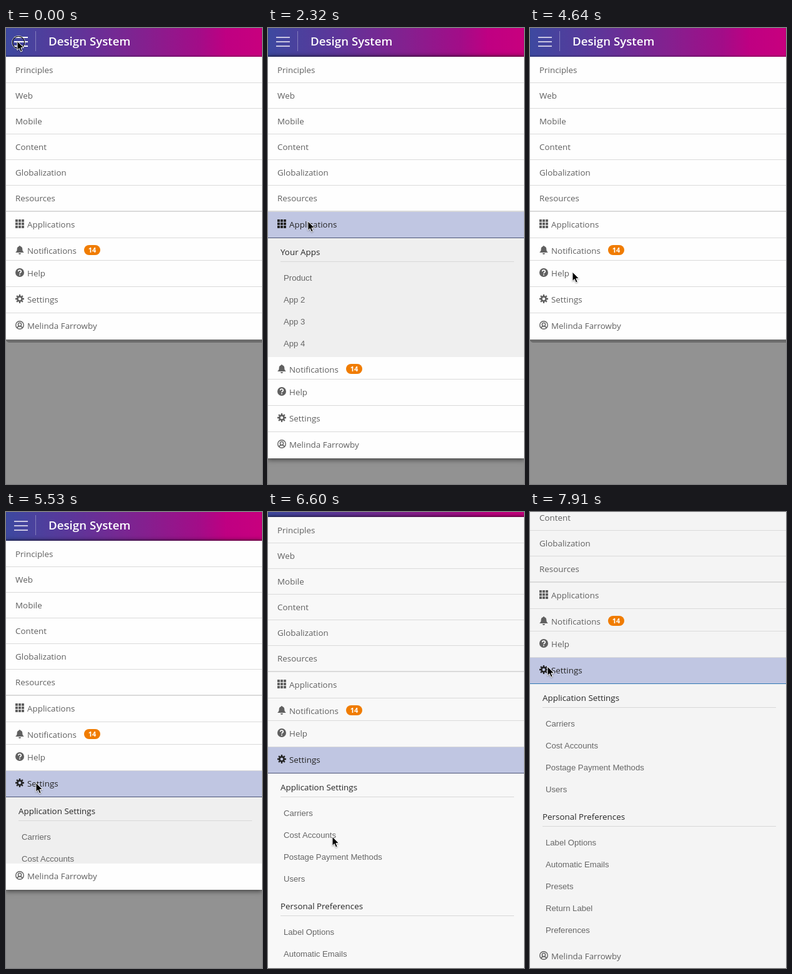
Animation, 410 px wide and 729 px high, one loop 7.99 s. Source, as an HTML page:

```html
<!DOCTYPE html>
<html lang="en">
<head>
<meta charset="utf-8">
<title>Menu</title>
<style>
html, body { margin: 0; width: 100%; height: 100%; overflow: hidden; background: #929292; }
#stage { position: relative; width: 410px; height: 729px; overflow: hidden; background: #929292;
  font: 500 13.4px/40px "Open Sans", "Noto Sans", sans-serif; color: #606060;
  --panel: #fefefe; --sub: #efefef; --edge: #4b5578; }
#page { position: absolute; left: 0; top: 0; width: 410px; }
header { position: relative; height: 46px;
  background: linear-gradient(90deg, #3d49a0, #5b379a 25%, #84208f 54%, #a20d88 75%, #bf0082 86%, #c8007e);
  box-shadow: inset 0 -2px 2px rgba(0,0,0,.22); }
header h1 { position: absolute; left: 68px; top: 0; margin: 0; color: #fff; font-size: 18.7px; font-weight: 600; line-height: 42px; white-space: nowrap; }
header::after { content: ""; position: absolute; left: 47px; top: 5px; width: 1px; height: 32px; background: rgba(255,255,255,.32); }
#burger { position: absolute; left: 13px; top: 14px; width: 22px; height: 16px; --line: #fff;
  background: linear-gradient(var(--line) 2px, transparent 2px 7px, var(--line) 7px 9px, transparent 9px 14px, var(--line) 14px); }
#panel { position: relative; background: var(--panel); box-shadow: 0 1px 8px 1px rgba(0,0,0,.6); }
#panel.closed { box-shadow: none; }
#panel.closed::after { content: ""; position: absolute; left: 0; right: 0; top: 100%; height: 5px; background: #6c6c6c; border-radius: 0 0 0 6px; }
.row { position: relative; box-sizing: border-box; height: 41px; padding-left: 15px; border-bottom: 1px solid #dadada; white-space: nowrap; }
.row.first { height: 42px; padding-top: 1px; }
.row.thick { height: 42px; border-bottom: 2px solid #dadada; }
.row.icon { height: 42px; padding-left: 34px; }
.row.short { height: 36px; }
.row.last { border: 0; }
.row svg { position: absolute; left: 15px; top: 12px; width: 14px; height: 14px; fill: currentColor; }
.row.on { background: #c0c6e2; border-color: var(--edge); color: #242424; }
.badge { position: absolute; left: 125px; top: 11px; width: 26px; height: 16px; border-radius: 8px; background: #f07c00;
  color: #fff; font-size: 11px; font-weight: 700; line-height: 16px; text-align: center; }
.sub { height: 0; overflow: hidden; background: var(--sub); }
.group { padding-bottom: 4px; }
.group h2 { margin: 0 16px 8px 20px; height: 37px; border-bottom: 1px solid #d8d8d8; color: #262626; font: inherit; line-height: 44px; }
.group div { height: 35px; padding-left: 25px; font: 13.15px/35px "Liberation Sans", Arial, sans-serif; color: #666; }
#cursor { position: absolute; left: -12px; top: -12px; width: 36px; height: 36px; overflow: visible; }
</style>
</head>
<body>
<div id="stage">
  <div id="page">
    <header><div id="burger"></div><h1>Design System</h1></header>
    <div id="panel">
      <div class="row first">Principles</div>
      <div class="row">Web</div>
      <div class="row">Mobile</div>
      <div class="row">Content</div>
      <div class="row">Globalization</div>
      <div class="row thick">Resources</div>
      <div class="row icon" id="apps">
        <svg viewBox="0 0 14 14"><path d="M0 2H14M0 7H14M0 12H14" fill="none" stroke="currentColor" stroke-width="4" stroke-dasharray="4 1"/></svg>Applications</div>
      <div class="sub" id="appsSub">
        <div class="group"><h2>Your Apps</h2><div>Product</div><div>App 2</div><div>App 3</div><div>App 4</div></div>
      </div>
      <div class="row icon short">
        <svg viewBox="0 0 14 14"><path d="M7 0C8 0 8 1 8 1C10.500 1.500 11.300 3.500 11.300 5.500C11.300 8.500 12.300 9.500 14 11H0C1.700 9.500 2.700 8.500 2.700 5.500C2.700 3.500 3.500 1.500 6 1C6 1 6 0 7 0ZM5 12H9A2 2 0 0 1 5 12Z"/></svg>Notifications<span class="badge">14</span></div>
      <div class="row icon">
        <svg viewBox="0 0 14 14"><circle cx="7" cy="7" r="7"/><path d="M4.700 5.300C4.700 2.300 9.300 2.300 9.300 5.200C9.300 6.800 7 6.800 7 8.600M7 9.800V11.400" fill="none" stroke="#fff" stroke-width="1.700"/></svg>Help</div>
      <div class="row icon" id="settings">
        <svg viewBox="0 0 14 14"><g fill="none" stroke="currentColor"><circle cx="7" cy="7" r="3.600" stroke-width="2.600"/><path d="M7 0V3M7 11V14M0 7H3M11 7H14M2.100 2.100L4 4M10 10L11.900 11.900M2.100 11.900L4 10M10 4L11.900 2.100" stroke-width="2.300"/></g></svg>Settings</div>
      <div class="sub" id="settingsSub">
        <div class="group"><h2>Application Settings</h2><div>Carriers</div><div>Cost Accounts</div><div>Postage Payment Methods</div><div>Users</div></div>
        <div class="group"><h2>Personal Preferences</h2><div>Label Options</div><div>Automatic Emails</div><div>Presets</div><div>Return Label</div><div>Preferences</div></div>
      </div>
      <div class="row icon last">
        <svg viewBox="0 0 14 14"><g fill="none" stroke="currentColor" stroke-width="1.400"><circle cx="7" cy="7" r="6.300"/><circle cx="7" cy="6" r="2.600"/><path d="M3 11.500C3.500 9.300 5 8.800 7 8.800S10.500 9.300 11 11.500"/></g></svg>Melinda Farrowby</div>
    </div>
  </div>
  <svg id="cursor" viewBox="-12 -12 36 36">
    <g id="ring" fill="none"><circle cx="2" cy="2" r="10.400" stroke="#fff" stroke-width="1"/><circle cx="2" cy="2" r="9.700" stroke="#111" stroke-width="1.200"/></g>
    <path d="M0 0V14.500L3.300 11.500L5.600 17L8.200 15.900L5.900 10.600H10.500Z" fill="#000" stroke="#fff" stroke-width="1" style="filter:drop-shadow(0 1px 1px rgba(0,0,0,.35))"/>
  </svg>
</div>
<script>
const $ = id => document.getElementById(id);
const LOOP = 7990, SLOW = 6248;

// Each key is [step, ...values]; values run straight between keys.
const cursorKeys = [
  [49, 64, 309], [52, 68, 390], [54, 68, 463], [56, 56, 448], [58, 49, 436], [59, 48, 433],
  [69, 48, 433], [71, 80, 490], [73, 103, 519], [84, 103, 519],
  [85, 92, 495], [86, 26, 336], [87, 22, 278], [88, 28, 253], [89, 28, 247]];
const appsKeys = [[23, 0], [24, .3], [25, .8], [26, 1], [44, 1], [45, .7], [46, .2], [47, 0]];
const settingsKeys = [[60, 0], [61, .02], [62, .2555], [63, .75], [64, .93], [65, 1]];
const scrollKeys = [[73, 0], [74, 38], [75, 80], [76, 108], [77, 118], [78, 118],
  [79, 150], [80, 183], [81, 187], [82, 184], [83, 181]];

function track(keys, k) {
  const next = keys.findIndex(key => key[0] > k);
  if (next === 0) return keys[0].slice(1);
  if (next < 0) return keys[keys.length - 1].slice(1);
  const a = keys[next - 1], b = keys[next], u = (k - a[0]) / (b[0] - a[0]);
  return a.slice(1).map((v, i) => v + (b[i + 1] - v) * u);
}

const stepAt = t => t < SLOW ? Math.floor((t + 5) / 89.25) : 70 + Math.floor((t - SLOW) / 87.2);

const between = (k, from, to) => k >= from && k < to;

function cursorAt(k) {
  if (k > 11) return track(cursorKeys, k);
  const u = k / 11, s = u * u * (3 - 2 * u);
  return [18 + 46 * s, 21 + 288 * s];
}

function draw(k) {
  const [x, y] = cursorAt(k);
  const apps = track(appsKeys, k)[0], settings = track(settingsKeys, k)[0];
  const flat = k >= 79 ? '#f4f4f4' : k >= 70 ? '#f8f8f8' : '';
  const stage = $('stage').style;

  $('cursor').style.transform = `translate(${x}px, ${y}px)`;
  $('ring').style.display = k < 1 || between(k, 22, 24) || between(k, 43, 45) || between(k, 59, 61) ? '' : 'none';
  $('page').style.transform = `translateY(${-track(scrollKeys, k)[0]}px)`;
  $('appsSub').style.height = Math.round(190 * apps) + 'px';
  $('settingsSub').style.height = Math.round(415 * settings) + 'px';
  $('apps').classList.toggle('on', between(k, 24, 45));
  $('settings').classList.toggle('on', k >= 61);
  $('panel').classList.toggle('closed', apps + settings === 0);
  $('burger').style.setProperty('--line', k < 24 ? '#fff' : '#c9c5e2');
  stage.setProperty('--panel', flat || '#fefefe');
  stage.setProperty('--sub', flat || '#efefef');
  stage.setProperty('--edge', k >= 79 ? '#2f78b4' : '#4b5578');
}

const start = performance.now();
function tick() {
  draw(stepAt((performance.now() - start) % LOOP));
  requestAnimationFrame(tick);
}
tick();
</script>
</body>
</html>
```
